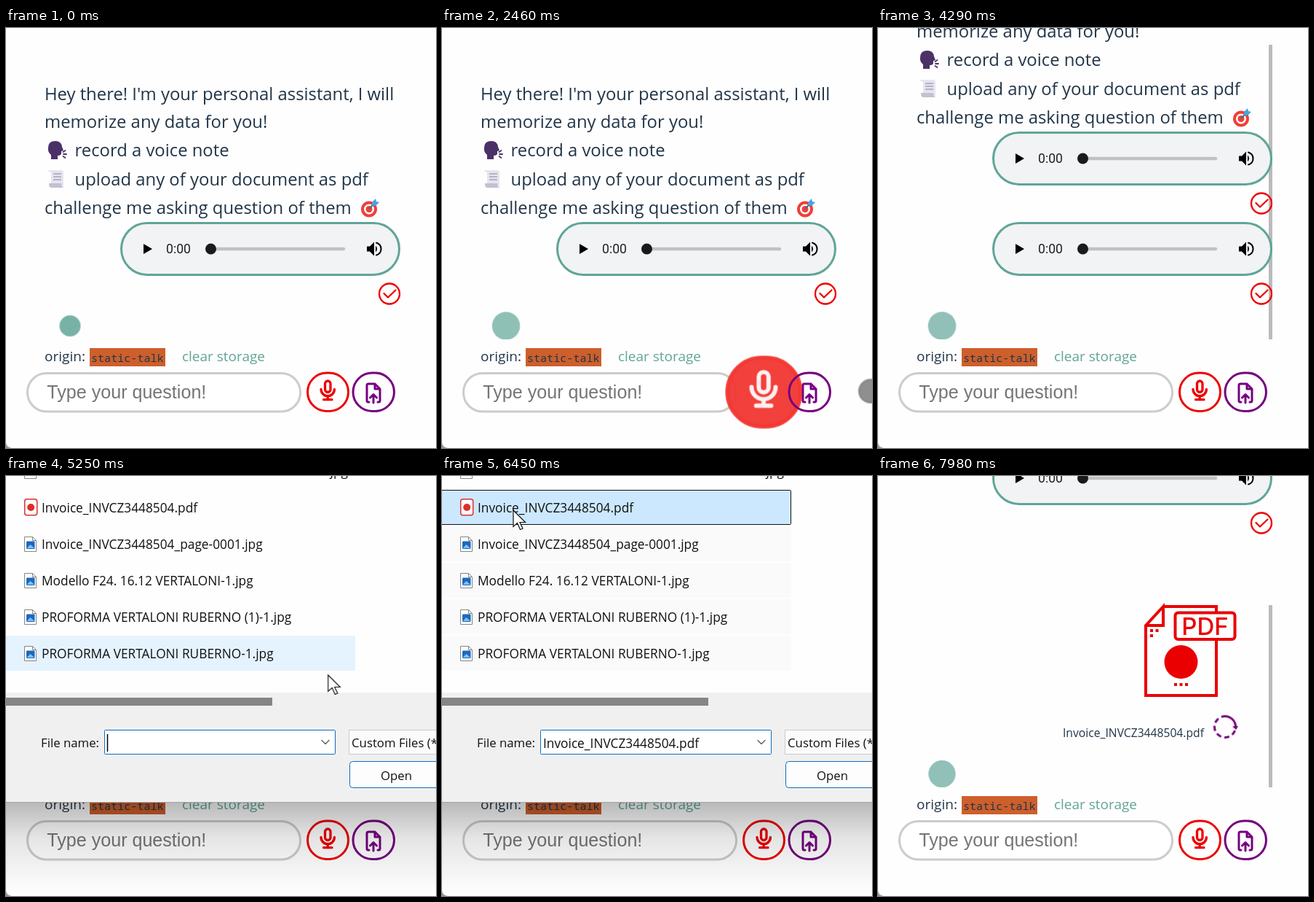
These frames come from a looping animation (591x576 px, 8 s). An HTML page:

```html
<!DOCTYPE html>
<html lang="en">
<head>
<meta charset="utf-8">
<title>Voice and document assistant</title>
<style>
html, body { margin: 0; width: 100%; height: 100%; overflow: hidden; background: #fefefe; }
body > svg { display: block; width: 591px; height: 576px; }
text { font-family: "Open Sans", "Noto Sans", sans-serif; fill: #213547; white-space: pre; }
.time { font: 17.6px Roboto, sans-serif; fill: #222; }
.chat text { font-size: 23.85px; }
.chat text.name { font-size: 15.66px; }
.chat text.badge { font: 500 33px Inter, sans-serif; fill: #ea0000; }
.bar text { font-size: 19px; }
.bar text.link { fill: #60a598; }
.bar text.code { font: 15.1px "Noto Sans Mono", "DejaVu Sans Mono", monospace; }
.bar text.hint { font: 25.1px "Liberation Sans", Arial, sans-serif; fill: #757575; }
.dialog text { font-size: 17.3px; fill: #111; }
.dialog text.label { font-size: 16.8px; }
.line { fill: none; stroke-linecap: round; stroke-linejoin: round; }

.scroll, .thumb, .reply, .dot, .mic, .disc, .icon, .tap, .dialog, .row, .caret, .picked, .touch, .arrow {
  animation: 8s linear infinite;
}
.step { animation-timing-function: step-end; }

.scroll { animation-name: scroll; }
@keyframes scroll {
  0%, 36% { transform: none; animation-timing-function: ease-in-out; }
  39.5%, 94% { transform: translateY(-124px); animation-timing-function: ease-in-out; }
  97.5%, 100% { transform: translateY(-424px); }
}
.thumb { animation-name: thumb, later; animation-timing-function: linear, step-end; }
@keyframes thumb {
  0%, 36% { transform: translateY(-99px); animation-timing-function: ease-in-out; }
  39.5%, 94% { transform: none; animation-timing-function: ease-in-out; }
  97.5%, 100% { transform: translateY(154px); }
}
.reply { animation-name: later; }
@keyframes later { 0% { visibility: hidden; } 36%, 100% { visibility: visible; } }

.dot { animation-name: pulse; animation-timing-function: cubic-bezier(.37, 0, .63, 1); transform-origin: 88px 408.5px; }
@keyframes pulse {
  0% { transform: scale(1.45); opacity: .85; animation-timing-function: cubic-bezier(.61, 1, .88, 1); }
  6.25%, 30%, 53.75%, 77.5% { transform: scale(1.93); opacity: .7; }
  18.125%, 41.875%, 65.625%, 89.375% { transform: scale(.97); opacity: 1; }
  100% { transform: scale(1.87); opacity: .7; }
}

.mic { animation-name: swell; transform-origin: 442.5px 499.2px; }
@keyframes swell {
  0%, 17.25% { transform: none; }
  18.375% { transform: scale(1.19); }
  20.25% { transform: scale(1.5); }
  27% { transform: scale(2); }
  30.75% { transform: scale(1.8); }
  35.5%, 100% { transform: none; }
}
.disc { animation-name: disc; }
@keyframes disc {
  0%, 17.2% { fill: #f000; stroke: #e00; }
  17.25%, 19% { fill: #d62c30; stroke: #d62c30; }
  27%, 35.45% { fill: #f23632f2; stroke: #f23632f2; }
  35.5%, 100% { fill: #f000; stroke: #e00; }
}
.icon { animation-name: icon; }
@keyframes icon {
  0%, 17.2% { stroke: #e00; }
  17.25%, 19% { stroke: #ccc; }
  27%, 35.45% { stroke: #fdf0f0; }
  35.5%, 100% { stroke: #e00; }
}
.tap { animation-name: tap; }
@keyframes tap { 0% { visibility: hidden; } 17.25% { visibility: visible; } 20.25%, 100% { visibility: hidden; } }

.touch { animation-name: touch, touching; animation-timing-function: linear, step-end; }
@keyframes touch {
  0%, 7.9% { transform: translate(547px, 440px); }
  8.8% { transform: translate(500px, 455px); }
  10%, 20.25% { transform: translate(447px, 498px); }
  20.3%, 31% { transform: translate(589px, 498px); }
  31.5% { transform: translate(615px, 500px); }
  31.6%, 55% { transform: translate(558px, 490px); }
  57%, 63% { transform: translate(505px, 499px); }
  63.1%, 92% { transform: translate(525px, 405px); }
  94.4% { transform: translate(585px, 425px); }
  95.2%, 100% { transform: translate(615px, 432px); }
}
@keyframes touching {
  0%, 20.25%, 31.5%, 63%, 95.2%, 100% { visibility: hidden; }
  7.5%, 30.6%, 55%, 92% { visibility: visible; }
}

.arrow { animation-name: arrow, pointing; animation-timing-function: linear, step-end; }
@keyframes arrow {
  0%, 63.1% { transform: translate(495px, 430px); }
  66.25% { transform: translate(430px, 235px); }
  67.5% { transform: translate(420px, 217px); }
  68.5%, 69.75% { transform: translate(380px, 153px); }
  70.9% { transform: translate(362px, 133px); }
  73.1%, 75% { transform: translate(112px, 54px); }
  76.9%, 81.3% { transform: translate(98px, 47px); }
  84%, 86.25% { transform: translate(560px, 531px); }
  89.6%, 100% { transform: translate(528px, 403px); }
}
@keyframes pointing { 0% { visibility: hidden; } 63.1% { visibility: visible; } 91.5%, 100% { visibility: hidden; } }

.dialog { animation-name: dialog; }
@keyframes dialog {
  0%, 62.25% { opacity: 0; }
  64.1%, 91.5% { opacity: 1; }
  93%, 100% { opacity: 0; }
}
.row { fill: #fff0; stroke: #0000; }
.row1 { animation-name: row1; }
.row2 { animation-name: row2; }
.row3 { animation-name: row3; }
.row4 { animation-name: row4; }
.row5 { animation-name: row5; }
@keyframes row1 { 72% { fill: #e5f3ff; stroke: #0000; } 78.75%, 100% { fill: #cce8ff; stroke: #111; } }
@keyframes row2 { 71.3% { fill: #e5f3ff; } 72%, 100% { fill: #fafafa; } }
@keyframes row3 { 69.8% { fill: #e5f3ff; } 71.3%, 100% { fill: #fafafa; } }
@keyframes row4 { 67.3% { fill: #e5f3ff; } 69.8%, 100% { fill: #fafafa; } }
@keyframes row5 { 65.4% { fill: #e5f3ff; } 67.3%, 100% { fill: #fafafa; } }
.caret { animation-name: caret; }
@keyframes caret { 0% { visibility: visible; } 72.5%, 100% { visibility: hidden; } }
.picked { animation-name: picked; }
@keyframes picked { 0% { visibility: hidden; } 78.75%, 100% { visibility: visible; } }

.spin { animation: spin 2s linear infinite; transform-origin: 477px 344px; }
@keyframes spin { to { transform: rotate(360deg); } }
</style>
</head>
<body>
<svg viewBox="0 0 591 576">
  <defs>
    <linearGradient id="shade" x2="0" y2="1">
      <stop stop-color="#000" stop-opacity=".27"/>
      <stop offset=".4" stop-color="#000" stop-opacity=".1"/>
      <stop offset="1" stop-color="#000" stop-opacity="0"/>
    </linearGradient>
    <g id="audio">
      <rect x="158.5" y="267.5" width="382" height="71" rx="35.5" fill="#f1f3f4" stroke="#60a598" stroke-width="3"/>
      <path d="M189 296v14l12-7z" fill="#000"/>
      <text class="time" x="220" y="309">0:00</text>
      <path class="line" d="M281 303H464" stroke="#bfc1c3" stroke-width="4.5"/>
      <circle cx="281.5" cy="303" r="7.5" fill="#1a1a1a"/>
      <path d="M496 299.5h4l6-6v19l-6-6h-4z"/>
      <path d="M508 298.5q4 4.5 0 9z"/>
      <path class="line" d="M509 294.5q6.500 2 6.500 8.500t-6.500 8.500" stroke="#000" stroke-width="2"/>
      <g class="line" stroke="#e00" stroke-width="2.300">
        <circle cx="527" cy="364.500" r="14"/>
        <path d="M519.500 364l5.500 5.500 10.500-10"/>
      </g>
    </g>
    <g id="image">
      <path d="M25.500 83.500h11l5 5v15h-16z" fill="#fff" stroke="#858585"/>
      <path d="M36.500 83.500v5h5" fill="none" stroke="#858585"/>
      <rect x="28" y="89.500" width="11.500" height="10.500" rx="1" fill="#1c68c0"/>
      <path d="M28.500 99l5-5 5.500 5z" fill="#7cc3f5"/>
    </g>
  </defs>

  <svg class="chat" width="591" height="427">
    <rect class="thumb" x="537" y="23" width="5" height="404" fill="#bbb"/>
    <g class="scroll">
      <text x="53" y="99">Hey there! I'm your personal assistant, I will</text>
      <text x="53" y="137">memorize any data for you!</text>
      <text x="94.500" y="176">record a voice note</text>
      <text x="94.500" y="216">upload any of your document as pdf</text>
      <text x="53" y="255">challenge me asking question of them</text>

      <path d="M58 164q0-9 10-9 8 0 9 8l2 5-3 1v3q0 3-5 3v5h-9v-6q-5-4-4-10z" fill="#4b3168"/>
      <path class="line" d="M78.500 170l3-2M79 173h4M78.500 176l3 2" stroke="#4b3168" stroke-width="1.800"/>
      <path d="M60 195h16q3 0 3 4v18H62V199q0-2-4-2 0-2 2-2z" fill="#e6e4ee"/>
      <path d="M59 213h17q0 6 5 6H62q-3 0-3-6z" fill="#c3c0d1"/>
      <path d="M65 200h11M65 204h11M65 208h11" stroke="#a5a2ba" stroke-width="1.500"/>
      <circle cx="499" cy="248.500" r="9" fill="#fff" stroke="#ee4038" stroke-width="4"/>
      <circle cx="499" cy="248.500" r="4.500" fill="#ee4038"/>
      <path d="M499 248l9-9" stroke="#37708f" stroke-width="2"/>
      <path d="M503 243v-4l5-5 1 4 4 1-5 5z" fill="#46a5e0"/>

      <use href="#audio"/>
      <g class="reply step"><use href="#audio" y="124"/></g>

      <g transform="translate(0 424)">
        <g class="line" stroke="#ea0000" stroke-width="4">
          <path d="M392 179H465V301H368V205L392 179V205H368" stroke-linejoin="miter"/>
          <rect x="408.500" y="187.500" width="82" height="36.500" rx="4" fill="#fefefe"/>
        </g>
        <text class="badge" x="449.500" y="218" text-anchor="middle">PDF</text>
        <path d="M374 212h13M374 219h5M407 286h20" stroke="#ea0000" stroke-width="4" stroke-dasharray="4 3.500"/>
        <circle cx="416.500" cy="255" r="23" fill="#ea0000"/>
        <text class="name" x="254" y="358">Invoice_INVCZ3448504.pdf</text>
        <g class="spin">
          <path d="M477 329.500a14.500 14.500 0 0 1 14.500 14.500" fill="none" stroke="#750080" stroke-width="3"/>
          <path d="M491.500 344a14.500 14.500 0 1 1-14.500-14.500" fill="none" stroke="#750080" stroke-width="3" stroke-dasharray="7 4.500" stroke-dashoffset="-6"/>
          <path d="M487 344h8l-3 5z" fill="#750080"/>
        </g>
      </g>
    </g>
    <circle class="dot" cx="88" cy="408.500" r="10" fill="#60a598"/>
  </svg>

  <g class="bar">
    <text x="53" y="457">origin:</text>
    <rect x="115" y="439" width="104" height="25" fill="#cd5f2c"/>
    <text class="code" x="117" y="457.500">static-talk</text>
    <text class="link" x="242" y="457">clear storage</text>
    <rect x="29.500" y="473.500" width="375" height="52.500" rx="26" fill="#fff" stroke="#ccc" stroke-width="3"/>
    <text class="hint" x="56.300" y="508">Type your question!</text>

    <g class="mic">
      <rect class="tap step" x="413" y="472" width="59" height="55" fill="#e1eef9"/>
      <rect class="disc" x="414.500" y="473" width="56" height="52.500" rx="26.250" stroke-width="3"/>
      <g class="icon line" stroke-width="3.300">
        <rect x="438.500" y="484" width="7.500" height="15.500" rx="3.750"/>
        <path d="M433 495.500a9.200 9.200 0 0 0 18.400 0M442.200 505v4.500M436.500 509.700h11.500"/>
      </g>
    </g>
    <g class="line" stroke="#750080" stroke-width="3">
      <rect x="477" y="473" width="56.500" height="52.500" rx="26.250"/>
      <path d="M499 513h-1q-2 0-2-2V490q0-2 2-2h9l7 7v16q0 2-2 2h-1M507 488v7h7M505 514V503M500.500 507l4.500-4.500 4.500 4.500"/>
    </g>
  </g>
  <path d="M0 569q1 6 8 7H0z" fill="#999"/>

  <g class="dialog">
    <rect y="447" width="591" height="125" fill="url(#shade)"/>
    <rect width="591" height="298" fill="#fefefe"/>
    <rect y="297" width="591" height="150" fill="#f0f0f0"/>
    <path d="M0 447.500H591" stroke="#a5a5a5"/>
    <rect y="304" width="366" height="11" fill="#858585"/>

    <rect class="row row1 step" x="-1" y="19.500" width="480.500" height="47" rx="1"/>
    <rect class="row row2 step" y="69" width="480" height="48"/>
    <rect class="row row3 step" y="119" width="480" height="48"/>
    <rect class="row row4 step" y="169" width="480" height="48"/>
    <rect class="row row5 step" y="219" width="480" height="48"/>

    <use href="#image" y="-100"/>
    <text x="470" y="-.500" text-anchor="end">jpg</text>
    <rect x="25.700" y="31.700" width="17" height="22" rx="3" fill="#fff" stroke="#d9302c" stroke-width="1.500"/>
    <circle cx="34.200" cy="43" r="5" fill="#d9302c"/>
    <text x="49" y="49.500">Invoice_INVCZ3448504.pdf</text>
    <use href="#image"/>
    <text x="49" y="99.500">Invoice_INVCZ3448504_page-0001.jpg</text>
    <use href="#image" y="50"/>
    <text x="49" y="149.500">Modello F24. 16.12 VERTALONI-1.jpg</text>
    <use href="#image" y="100"/>
    <text x="49" y="199.500">PROFORMA VERTALONI RUBERNO (1)-1.jpg</text>
    <use href="#image" y="150"/>
    <text x="49" y="249.500">PROFORMA VERTALONI RUBERNO-1.jpg</text>

    <text class="label" x="48" y="371.500">File name:</text>
    <rect x="135.500" y="348.500" width="317" height="33" rx="1" fill="#fff" stroke="#0f6cbd"/>
    <path class="caret step" d="M139.500 354v24" stroke="#000" stroke-width="1.500"/>
    <text class="picked step" x="139" y="372.500">Invoice_INVCZ3448504.pdf</text>
    <path class="line" d="M434 362.500l5 5 5-5" stroke="#555" stroke-width="1.200"/>
    <rect x="471.500" y="348.500" width="140" height="33" fill="#fbfbfb" stroke="#ccc"/>
    <text class="label" x="475" y="371.500">Custom Files (*.pdf)</text>
    <rect x="472.500" y="391.500" width="140" height="36" rx="4" fill="#fdfdfd" stroke="#0f6cbd"/>
    <text class="label" x="515" y="416.500">Open</text>
  </g>

  <circle class="touch" r="16" fill="#4449" stroke="#7777" stroke-width="3"/>
  <path class="arrow" d="M0 0V22.500L5.500 17.500 9.500 26.500 13 25 9 16.500H16.500z" fill="#fff" stroke="#111" stroke-width="1.200"/>
</svg>
</body>
</html>
```
